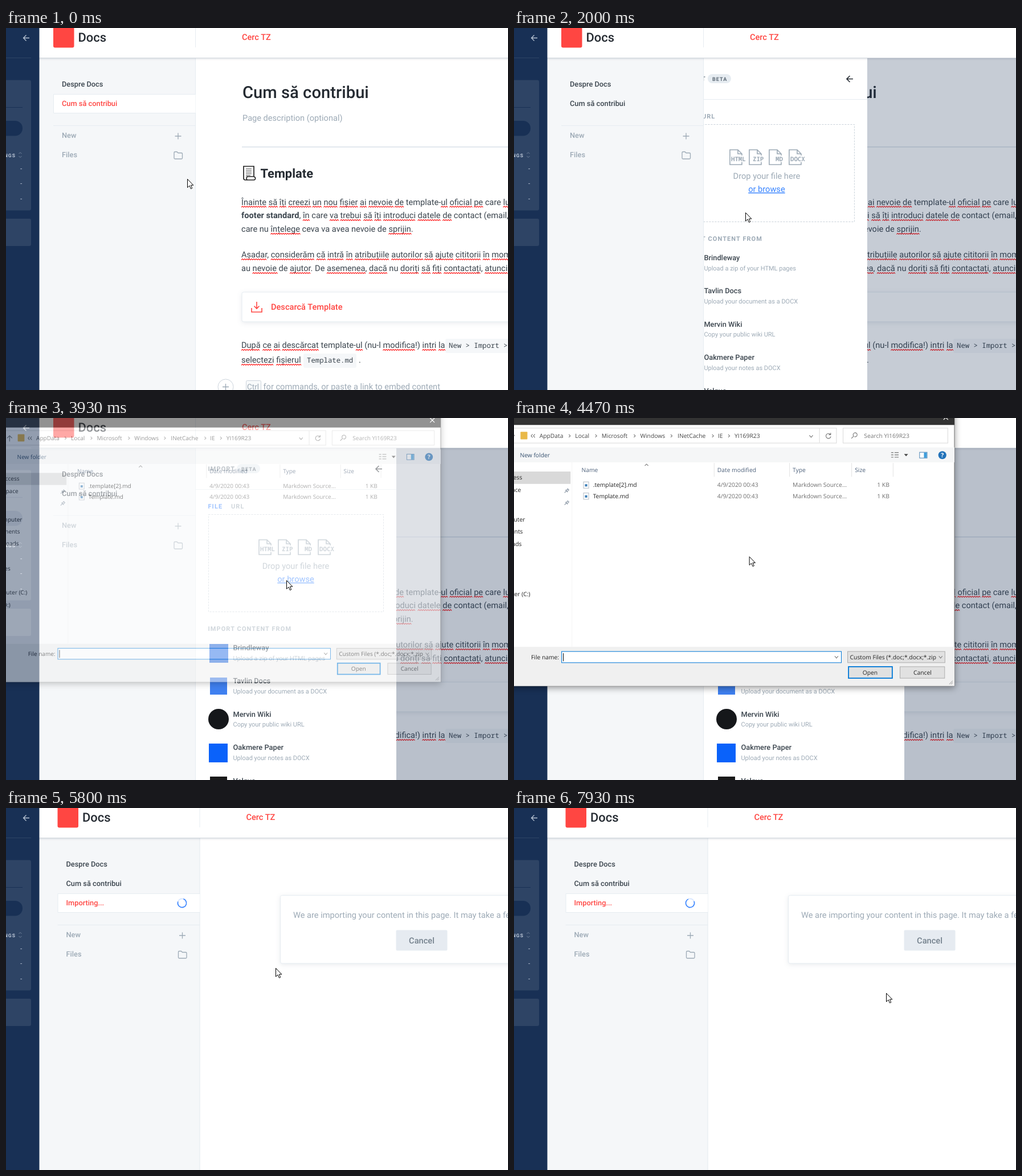
Write an HTML page that moves like this. It is 881 px wide and 636 px high and loops after 8000 ms.

```html
<!DOCTYPE html>
<html lang="ro">
<head>
<meta charset="utf-8">
<title>Import</title>
<style>
html, body { margin: 0; width: 100%; height: 100%; overflow: hidden; background: #fff; }
svg { display: block; width: 100vw; height: 100vh; font-family: Roboto, sans-serif; text-rendering: geometricPrecision; }
.mono { font-family: "Noto Sans Mono", monospace; }
.sys { font-family: "Open Sans", sans-serif; }
.caps { letter-spacing: 1.1px; font-weight: 700; }
.card { filter: drop-shadow(0 2px 4px rgba(40, 60, 90, .1)); }
.pop { filter: drop-shadow(0 2px 6px rgba(40, 60, 90, .2)); }
.win { filter: drop-shadow(0 3px 6px rgba(0, 0, 0, .4)); }
</style>
</head>
<body>
<svg id="stage" viewBox="0 0 881 636"></svg>
<script>
const RED = '#ff4642', DARK = '#242a31', BODY = '#3b454e', GREY = '#9daab6',
      LINE = '#e6ecf1', BLUE = '#3884ff', NAVY = '#183055', SLATE = '#2e4465';

const text = (x, y, s, size, fill, weight = 400, more = '') =>
  `<text x="${x}" y="${y}" font-size="${size}" fill="${fill}" font-weight="${weight}" ${more}>${s}</text>`;
const rect = (x, y, w, h, fill, more = '') =>
  `<rect x="${x}" y="${y}" width="${w}" height="${h}" fill="${fill}" ${more}/>`;
const path = (d, stroke, width = 1.3, more = '') =>
  `<path d="${d}" fill="none" stroke="${stroke}" stroke-width="${width}" ${more}/>`;
const group = (id, s, more = '') => `<g id="${id}" ${more}>${s}</g>`;
const at = (x, y, s) => `<g transform="translate(${x} ${y})">${s}</g>`;
const MID = 'text-anchor="middle"', END = 'text-anchor="end"', CAPS = 'class="caps"';

// Words between underscores get a spelling squiggle.
const prose = (y, s) => text(413, y, s.replace(/_(.+?)_/g, (m, run) =>
  run.replace(/[^\s,.()!]+/g, '<tspan class="typo">$&</tspan>')), 14.6, BODY);
const code = (x, y, w, s) =>
  rect(x, y - 16, w, 25, '#f5f7f9', 'rx="3"') + text(x + 6, y, s, 12.3, BODY, 400, 'class="mono"');
const download = (x, y, k, color) =>
  at(x, y, path(`M0 ${-9 * k}V${3 * k}M${-4.5 * k} ${-1.5 * k}L0 ${3 * k}L${4.5 * k} ${-1.5 * k}` +
    `M${-9 * k} ${2 * k}V${9 * k}H${9 * k}V${2 * k}`, color, 1 + .6 * k));

const scroll = at(415, 242,
  path('M2 1H20V19Q23 20 22.500 23Q22 25 20 25H5Q2 25 2 22ZM20 19H8Q6 25 9 25', '#222', 1.7) +
  path('M6 5H16M6 8H16M6 11H16M6 14H16M6 17H14', '#555', 1));

const article = group('article',
  text(415, 123, 'Cum să contribui', 29.2, DARK, 500) +
  text(415, 162.5, 'Page description (optional)', 14.6, GREY) +
  path('M414 209H881', '#d9e0e8', 1.4) + scroll +
  text(446.5, 263, 'Template', 21.9, DARK, 700) +
  prose(310.5, '_Înainte să îți creezi un nou fișier ai nevoie de_ template-_ul oficial pe_ care _lua_') +
  prose(334, '<tspan font-weight="700">footer standard</tspan>, _în_ care _va trebui să îți introduci datele de_ contact (email,') +
  prose(358, 'care nu _înțelege_ ceva va avea nevoie de _sprijin_.') +
  prose(403, '_Așadar_, _considerăm că intră în atribuțiile autorilor să ajute cititorii în momentul_') +
  prose(427, 'au _nevoie_ de _ajutor_. De _asemenea_, _dacă_ nu _doriți să fiți contactați_, _atunci_') +
  rect(414, 464, 480, 52, '#fff', `stroke="${LINE}" rx="3" class="card"`) +
  download(440, 490, 1, RED) +
  text(465, 494.5, 'Descarcă Template', 14.6, RED, 500) +
  prose(562, '_După ce ai descărcat_ template-_ul_ (nu-l _modifica_!) _intri la_') +
  code(771, 562, 130, 'New &gt; Import &gt;') +
  prose(588, '_selectezi fișierul_') + code(522, 588, 93, 'Template.md') +
  text(619, 588, '.', 14.6, BODY) +
  group('hint',
    `<circle cx="385.500" cy="630.500" r="13.500" fill="#fff" stroke="#ccd4dc"/>` +
    path('M380 630.500H391M385.500 625V636', GREY) +
    rect(421.5, 619.5, 26, 22, '#f8fafb', 'stroke="#ccd4dc" rx="2"') +
    text(423, 635, 'Ctrl', 13.5, GREY) +
    text(451.5, 635, 'for commands, or paste a link to embed content', 14.6, GREY)));

const progress = group('progress',
  rect(481.5, 153.5, 480, 119.5, '#fff', `stroke="${LINE}" rx="3" class="card"`) +
  text(504, 192.5, 'We are importing your content in this page. It may take a few seconds', 14.6, GREY) +
  rect(684.5, 214.5, 90, 36, '#e6ebf1', 'rx="2"') +
  text(729.5, 237.5, 'Cancel', 14.6, '#74818d', 500, MID));

const fileIcon = (x, label, lx) =>
  path(`M${x} 214H${x + 14}L${x + 21} 221V240H${x}ZM${x + 14} 214V221H${x + 21}`, GREY, 1.6) +
  rect(lx - 1, 224, label.length * 6.5 + 2, 11.5, '#fff') +
  text(lx, 234, label, 10.8, GREY, 700, 'class="mono"');

const providers = [
  ['Brindleway', 'Upload a zip of your HTML pages', rect(357, 397, 33, 33, '#1f6ae6')],
  ['Tavlin Docs', 'Upload your document as a DOCX', rect(358, 456, 30, 30, '#3f80f0')],
  ['Mervin Wiki', 'Copy your public wiki URL', '<circle cx="373" cy="529" r="18" fill="#15171a"/>'],
  ['Oakmere Paper', 'Upload your notes as DOCX', rect(356, 572, 33, 33, '#0a62fa')],
  ['Velqua', 'Upload a zip of your pages', rect(358, 630, 30, 30, '#1a1a1a')],
].map(([name, note, mark], i) => mark +
  text(398.5, 408 + i * 58.4, name, 12.8, BODY, 500) +
  text(398.5, 425.5 + i * 58.4, note, 10.97, GREY)).join('');

const panel = group('panel',
  rect(333, 53, 352, 583, '#fff') +
  text(354.5, 92.5, 'IMPORT', 10.97, '#74818d', 700, CAPS) +
  rect(405, 81, 41, 16, LINE, 'rx="8"') + text(413, 92.5, 'BETA', 9.1, '#5c6975', 700, CAPS) +
  path('M660 89.500H649M654.500 84L649 89.500L654.500 95', DARK, 1.6) +
  path('M333 125.500H685', LINE, 1) +
  text(354.5, 159, 'FILE', 10.97, BLUE, 700, CAPS) + text(395, 159, 'URL', 10.97, GREY, 700, CAPS) +
  rect(355.5, 169.5, 307, 171, 'none', 'stroke="#c9d1d9" stroke-dasharray="3 2"') +
  fileIcon(444, 'HTML', 446) + fileIcon(478, 'ZIP', 484) +
  fileIcon(513, 'MD', 524) + fileIcon(548, 'DOCX', 550) +
  text(508.5, 264.5, 'Drop your file here', 14.6, GREY, 400, MID) +
  text(508.5, 288, 'or browse', 14.6, BLUE, 400, MID + ' text-decoration="underline"') +
  text(354.5, 373.5, 'IMPORT CONTENT FROM', 10.97, GREY, 700, CAPS) + providers);

const shell = group('shell',
  rect(40, 53, 293, 583, '#f5f7f9') + path('M332.500 53V636', LINE, 1) +
  text(98, 103, 'Despre Docs', 12.8, BODY, 500) +
  group('selected', rect(83.5, 116.5, 249, 33, '#fff') + path('M333 116.500H83.500V149.500H333', LINE, 1)) +
  text(98, 137, 'Cum să contribui', 12.8, BODY, 500, 'id="current"') +
  group('importing', rect(83.5, 150.5, 249, 33, '#fff') + path('M333 150.500H83.500V183.500H333', LINE, 1) +
    text(98, 171, 'Importing...', 12.8, RED, 500) +
    at(301.5, 167, '<circle r="7.600" fill="none" stroke="#d6e5ff" stroke-width="1.600"/>' +
      path('M0 -7.600A7.600 7.600 0 1 0 7.600 0', BLUE, 1.6, 'id="spinner"'))) +
  group('tools', path('M83 171.500H333', LINE, 1) +
    text(98, 193, 'New', 12.8, GREY, 500) + path('M296.500 190H307.500M302 184.500V195.500', GREY) +
    text(98, 227, 'Files', 12.8, GREY, 500) +
    path('M295 219Q295 217.500 296.500 217.500H300L302 219.500H308Q309.500 219.500 309.500 221V228.500Q309.500 230 308 230H296.500Q295 230 295 228.500Z', GREY)) +
  rect(40, 0, 900, 52, '#fff', 'style="filter:drop-shadow(0 1px 2px rgba(40,60,90,.3))"') +
  path('M332.500 0V34', LINE, 1) +
  rect(83, -2, 36.5, 36.5, RED, 'rx="3"') +
  text(126.5, 24, 'Docs', 21.9, DARK, 500) + text(414, 21, 'Cerc TZ', 14.6, RED, 500));

const rail = rect(0, 0, 58.5, 636, NAVY) +
  path('M41 17.500H30.500M35.500 12.500L30.500 17.500L35.500 22.500', '#b9c4d4') +
  path('M0 52.500H44', SLATE, 1) +
  rect(-9, 91.5, 53, 229, SLATE, 'rx="3"') + rect(-9, 335, 53, 48, SLATE, 'rx="3"') +
  path('M0 139.500H29', NAVY, 1) + rect(-60, 163, 89, 26.5, NAVY, 'rx="13"') +
  text(17, 226.5, 'PINGS', 8.6, '#b9c4d4', 700, END + ' letter-spacing="1"') +
  path('M22.500 221L25 218.500L27.500 221M22.500 225L25 227.500L27.500 225', '#71829b', 1) +
  [251, 277, 304].map(y => text(25, y, '-', 12, '#b9c4d4')).join('');

const entries = [
  ['New page', 'Create a new plain text page.', 'M-6 0H6M0 -6V6'],
  ['New group', 'Group pages around key topics.', 'M-7 -3H-1M-4 -6V0M1 -4H8M1 0H8M-4 5H8'],
  ['New external link', 'Link to external websites.', 'M-1 -5H-6V7H6V2M1 -7H7V-1M7 -7L-2 2'],
  ['New variant', 'Create a translation or API version.', 'M-7 -3.500L0 -7L7 -3.500L0 0ZM-7 0L0 3.500L7 0M-7 3.500L0 7L7 3.500'],
  ['Import', 'Markdown, Text, DOCX, HTML.', 'M0 -7V3M-3.500 -.5L0 3L3.500 -.5M-6.500 2V6.500H6.500V2'],
].map(([name, note, icon], i) => at(0, i * 69.4,
  at(348.5, 43, path(icon, GREY)) +
  text(364, 47.5, name, 12.8, DARK, 500) + text(340, 65, note, 10.97, GREY, 500) +
  (i ? path('M340 16.500H512', '#dce2e8', 1.5) : ''))).join('');

const menu = group('menu',
  `<path d="M328.500 18.500H524.500Q527.500 18.500 527.500 21.500V358Q527.500 361 524.500 361H328.500Q325.500 361 325.500 358V196L319.500 190L325.500 184V21.500Q325.500 18.500 328.500 18.500Z" fill="#fff" stroke="#d8dfe6" class="pop"/>` +
  entries);

const sys = (x, y, s, fill = '#444', more = '') => text(x, y, s, 10.2, fill, 400, more);
const sign = (d, color = '#777', w = 1.1) => path(d, color, w);
const down = (x, y) => sign(`M${x - 3} ${y - 2}L${x} ${y + 1.5}L${x + 3} ${y - 2}`);
const crumbs = [[48, 'AppData'], [110, 'Local'], [156, 'Microsoft'], [223, 'Windows'],
  [288, 'INetCache'], [358, 'IE'], [387, 'YI169R23']];
const places = [[18, 109, 'Quick access'], [16, 131, 'Workspace'], [23, 182, 'This computer'], [19, 203, 'Documents'],
  [17, 225, 'Downloads'], [2, 269, 'Pictures'], [32, 312, 'Computer (C:)'], [2, 334, 'Data (D:)']];
const row = (y, name) => rect(124.5, y - 9, 9, 11, '#fff', 'stroke="#b5bcc4"') +
  rect(127, y - 5, 4, 4, '#3c7fb8') + sys(141, y, name, '#222') + sys(357, y, '4/9/2020 00:43', '#6d6d6d') +
  sys(488, y, 'Markdown Source...', '#6d6d6d') + sys(656, y, '1 KB', '#6d6d6d', END);

const dialog = group('dialog',
  rect(-22, -90, 791, 558, '#fff', 'stroke="#777" class="win"') +
  rect(-22, -90, 791, 104, '#333') + group('close', sign('M750 -3L758 5M758 -3L750 5', '#fff', 1.2)) +
  rect(-10, 19.5, 574, 26, '#fff', 'stroke="#d9d9d9"') +
  sign('M-4 33L.5 28.500L5 33M.5 28.500V39') +
  rect(15, 26, 12, 13, '#e9b949', 'rx="1"') + sign('M36 30L33.500 33L36 36M40 30L37.500 33L40 36') +
  crumbs.map(([x, s]) => sys(x, 36.5, s)).join('') +
  [100, 146, 213, 277, 349, 377].map(x => sign(`M${x - 1} 30.500L${x + 1.5} 33L${x - 1} 35.500`)).join('') +
  down(520, 34) + sign('M534.500 20V45', '#d9d9d9', 1) +
  sign('M553.500 30.500A4.300 4.300 0 1 0 554.300 34M554 27.500V31H550.500') +
  rect(575.5, 19.5, 182, 26, '#fff', 'stroke="#d9d9d9"') +
  sign('M594 33.500L590 37.500M594 33.500A3.500 3.500 0 1 1 595 34.200') + sys(612, 36.5, 'Search YI169R23', '#777') +
  rect(-22, 53, 791, 26, '#f5f6f7') + sys(14, 70, 'New folder', '#35506e') +
  sign('M659 62H663M659 66H663M659 70H663M665 62H672M665 66H672M665 70H672', '#888', 1.3) +
  '<path d="M681.500 64.500H688.500L685 68.500Z" fill="#444"/>' +
  rect(708.5, 61.5, 13, 10, '#fff', 'stroke="#4f86b5"') + rect(716, 62, 5, 9, '#3f9ddb') +
  '<circle cx="748" cy="66.500" r="7" fill="#2272b9"/>' + text(748, 70.5, '?', 10.5, '#fff', 700, MID) +
  rect(-22, 95, 124, 21.5, '#d9d9d9') + places.map(([x, y, s]) => sys(x, y, s, '#222', END)).join('') +
  [128, 149].map(y => sign(`M91.500 ${y + 4}L94.500 ${y + 1}M93 ${y - 1}L97 ${y + 3}M94.500 ${y}L97 ${y - 3}L99 ${y - 1}L96 ${y + 2}`, '#8a97a5', 1.2)).join('') +
  sign('M104.500 79V400', '#f4f4f4', 1) +
  [[121, 'Name'], [357, 'Date modified'], [488, 'Type'], [596, 'Size']].map(([x, s]) => sys(x, 96, s, '#4c607a')).join('') +
  sign('M231 85L234 82L237 85') + [351.5, 482.5, 590.5, 662.5].map(x => sign(`M${x} 80V104`, '#e3e3e3', 1)).join('') +
  rect(119.5, 128.5, 540, 18.5, '#e5f3ff', 'id="pick"') +
  row(122, '.template[2].md') + row(141.3, 'Template.md') +
  rect(-22, 400, 791, 68, '#f0f0f0') + sys(82, 421.5, 'File name:', '#222', END) +
  rect(86.5, 408, 486, 19.5, '#fff', 'id="field"') + down(564, 418) +
  sign('M89.500 411V425', '#000', 1).replace('<path', '<path id="caret"') +
  sys(90, 421.5, 'Template.md', '#222', 'id="chosen"') +
  rect(583.5, 408, 169, 19.5, '#e1e1e1', 'stroke="#adadad"') +
  sys(587.5, 421.5, 'Custom Files (*.doc;*.docx;*.zip', '#222') + down(745, 418) +
  rect(585, 434.5, 76, 20, '#e1e1e1', 'stroke="#0078d7" stroke-width="1.800"') + sys(622.5, 448, 'Open', '#222', MID) +
  rect(674.5, 434.5, 77.5, 20, '#e1e1e1', 'stroke="#adadad"') + sys(713.5, 448, 'Cancel', '#222', MID) +
  sign('M760 465L766 459M763 465L766 462', '#bbb', 1.2), 'class="sys"');

const cursor = group('cursor',
  '<path d="M.5 .5V15.300L4 12L6.400 17.500L8.700 16.500L6.400 11.200H10.800Z" fill="#fff" stroke="#000"/>' +
  path('M17 -7A6 6 0 1 1 11 -1', '#2f8fd8', 2.4, 'id="wait"'));

const stage = document.getElementById('stage');
stage.innerHTML = rect(0, 0, 881, 636, '#fff') + article + progress +
  rect(333, 53, 548, 583, NAVY, 'id="shade"') + panel + shell + rail + menu + dialog + cursor;

for (const word of stage.querySelectorAll('.typo')) {
  const a = word.getStartPositionOfChar(0), b = word.getEndPositionOfChar(word.getNumberOfChars() - 1);
  const d = `M${a.x} ${a.y + 4.5}` + 'l2 -2l2 2'.repeat(Math.round((b.x - a.x) / 4));
  word.parentNode.insertAdjacentHTML('afterend', path(d, '#f22', 1.1));
}

const el = id => document.getElementById(id);
const set = (id, name, value) => el(id).setAttribute(name, value);
const fade = (id, value) => set(id, 'opacity', +value);
const move = (id, x, y, more = '') => set(id, 'transform', `translate(${x} ${y})${more}`);
const ramp = (t, a, b) => Math.min(1, Math.max(0, (t - a) / (b - a)));
const easeOut = p => 1 - (1 - p) ** 2;
const smooth = p => p * p * (3 - 2 * p);

// Pointer stops: time, x, y
const stops = [[20, 318, 265], [270, 101, 191], [330, 113, 190], [680, 113, 190], [1400, 407, 231],
  [1530, 407, 245], [1570, 407, 245], [1800, 406, 324], [2480, 406, 324], [3270, 492, 285],
  [4220, 492, 285], [4930, 215, 139], [5430, 215, 139], [5800, 473, 281], [6300, 482, 286],
  [7150, 482, 286], [7930, 653, 325]];

function pointer(t) {
  let x = stops[0][1], y = stops[0][2];
  for (let i = 1; i < stops.length; i++) {
    const p = smooth(ramp(t, stops[i - 1][0], stops[i][0]));
    x += (stops[i][1] - stops[i - 1][1]) * p;
    y += (stops[i][2] - stops[i - 1][2]) * p;
  }
  return [x, y];
}

function draw(t) {
  const busy = t >= 5540, picked = t >= 4930;
  move('cursor', ...pointer(t));
  fade('wait', t >= 3400 && t < 3670);
  set('wait', 'transform', `rotate(${t * .36} 17 -1)`);

  const open = easeOut(ramp(t, 700, 860));
  fade('menu', t < 1860 ? open : 0);
  move('menu', 0, -8 * (1 - open));
  fade('hint', t < 730);

  const slide = easeOut(ramp(t, 1830, 2130)) * (1 - ramp(t, 5440, 5640) ** 2);
  move('panel', -352 * (1 - slide), 0);
  fade('panel', slide > 0);
  fade('shade', .3 * slide);

  move('shell', busy ? 7.5 : 0, 0);
  fade('article', !busy);
  fade('progress', busy);
  fade('importing', busy);
  fade('selected', t < 1860);
  set('current', 'fill', t < 1860 ? RED : BODY);
  move('tools', 0, busy ? 34 : 0);
  set('spinner', 'transform', `rotate(${t * .36 % 360})`);

  const shown = easeOut(ramp(t, 3800, 4130)) * (1 - ramp(t, 5060, 5330) ** 3);
  fade('dialog', shown ** 1.4);
  move('dialog', 376, 190, ` scale(${.94 + .07 * shown}) translate(-376 -190)`);
  fade('close', t < 5130);
  fade('pick', t >= 4820);
  set('pick', 'fill', picked ? '#cce8ff' : '#e5f3ff');
  set('pick', 'stroke', picked ? '#99d1ff' : 'none');
  set('field', 'stroke', picked ? '#7a7a7a' : '#0078d7');
  fade('caret', !picked);
  fade('chosen', picked);
}

const start = performance.now();
(function tick() {
  draw((performance.now() - start) % 8000);
  requestAnimationFrame(tick);
})();
</script>
</body>
</html>
```
